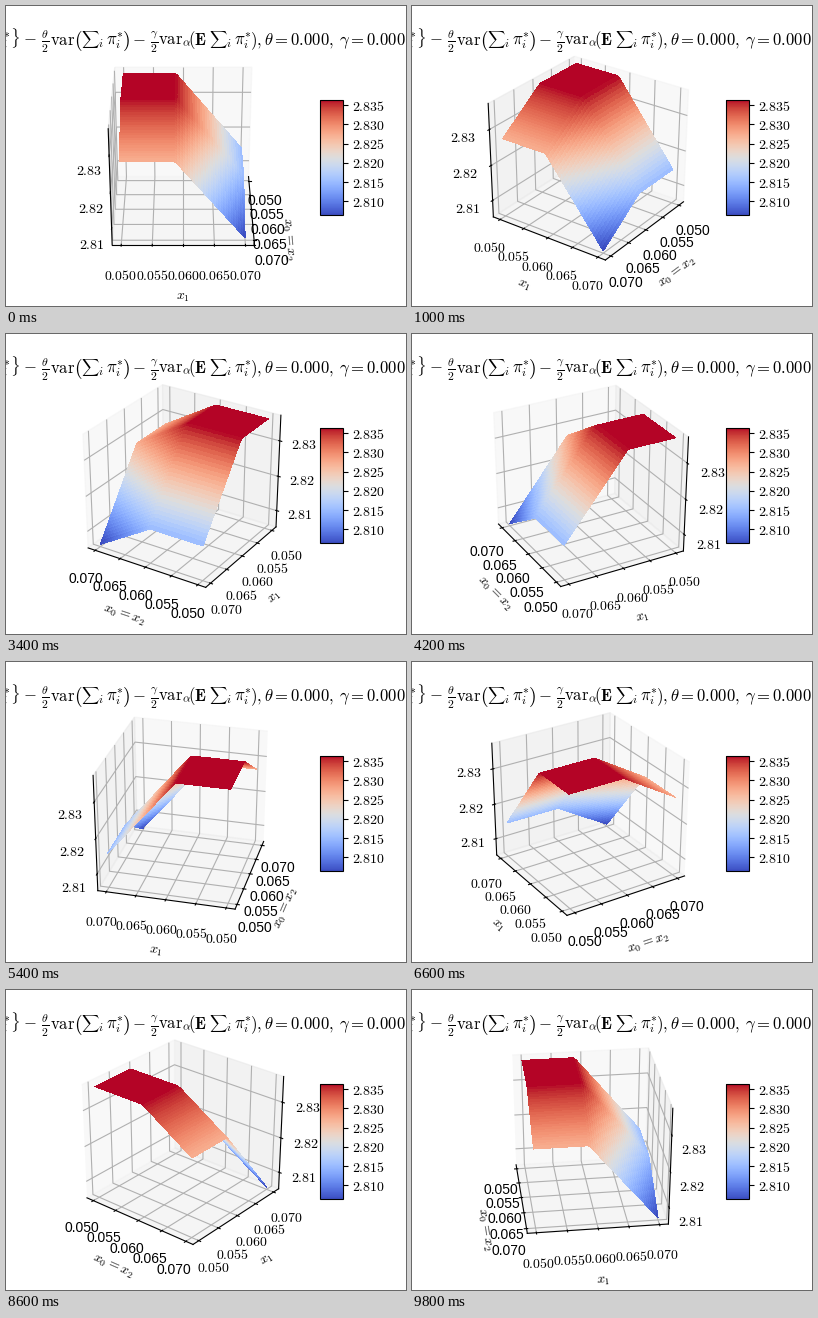
A matplotlib script that plays this animation: 400x300 px, repeating every 10000 ms.

```python
import numpy as np
import matplotlib.pyplot as plt
from matplotlib.animation import FuncAnimation

W, H = 400, 300
FRAMES, STEP_MS = 50, 200
LO, HI = 0.050, 0.070
KINK_X, KINK_Y = 0.060, 0.0587
Z_LO, Z_HI = 2.8058, 2.8364
BASELINE = 39

plt.rcParams.update({
    "font.family": "Liberation Sans",
    "mathtext.fontset": "cm",
    "font.size": 10,
})


def ramp(v, kink):
    return np.clip((v - kink) / (HI - kink), 0, None)


def padded(lo, hi, margin=0.0):
    """Limits widened by a data margin, then by the 3D pane margin."""
    pad = (hi - lo) * margin
    lo, hi = lo - pad, hi + pad
    edge = (hi - lo) / 48
    return lo - edge, hi + edge


def math_labels(ticks, digits):
    return [f"${t:.{digits}f}$" for t in ticks]


def box(x, y, w, h):
    return [x / W, y / H, w / W, h / H]


fig = plt.figure(figsize=(W / 100, H / 100), dpi=100, facecolor="white")
ax = fig.add_axes(box(50, 33, 248, 231), projection="3d")
# Fill the whole rectangle instead of shrinking to a square
ax.apply_aspect = lambda position=None: None
ax.set_box_aspect((1, 1, 1), zoom=np.sqrt(3) / 1.8294640721620434)

grid = np.linspace(LO, HI, 50)
X, Y = np.meshgrid(grid, grid)
Z = Z_HI - (Z_HI - Z_LO) * (0.3 * ramp(X, KINK_X) + 0.7 * ramp(Y, KINK_Y))
surf = ax.plot_surface(X, Y, Z, rstride=1, cstride=1, cmap="coolwarm",
                       linewidth=0, antialiased=False)

ax.set_xlim(*padded(LO, HI, 0.05))
ax.set_ylim(*padded(LO, HI, 0.05))
ax.set_zlim(*padded(Z_LO, Z_HI))

ticks = np.linspace(LO, HI, 5)
z_ticks = [2.81, 2.82, 2.83]
ax.set_xticks(ticks, labels=[f"{t:.3f}" for t in ticks])
ax.set_yticks(ticks, labels=math_labels(ticks, 3))
ax.set_zticks(z_ticks, labels=math_labels(z_ticks, 2))
ax.set_xlabel("$x_0=x_2$")
ax.set_ylabel("$x_1$")

cax = fig.add_axes(box(313.5, 90.75, 23.1, 115.5))
bar = fig.colorbar(surf, cax=cax)
bar_ticks = np.linspace(2.810, 2.835, 6)
bar.set_ticks(bar_ticks, labels=math_labels(bar_ticks, 3))


def put(x, tex, size=12, drop=0.0, ha="left"):
    fig.text(x / W, 1 - (BASELINE + drop) / H, f"${tex}$",
             size=size, ha=ha, va="baseline")


def put_sum(x):
    """Inline-size sum over i of pi, centred on the math axis."""
    put(x, r"\sum", size=8.7, drop=-1.5)
    put(x + 17.5, r"{}_i\,\pi_i^{*}")


# Title with inline spacing; it runs past the left edge
put(14, r"\pi_i^{*}\}", ha="right")
put(17, r"-\:\,\frac{\theta}{2}")
put(44.5, r"\mathrm{var}")
put(67.5, "(", size=14, drop=0.8)
put_sum(75)
put(115.8, ")", size=14, drop=0.8)
put(126.5, r"-\:\,\frac{\gamma}{2}")
put(152.3, r"\mathrm{var}_\alpha")
put(181.5, r"(\mathbf{E}")
put_sum(203)
put(244, "),")
put(258.5, r"\theta=0.000,")
put(333, r"\gamma=0.000")


def update(i):
    # The tiny offset settles which edges carry the axes at right angles
    ax.view_init(elev=30, azim=360 * i / FRAMES + 1e-5)
    return []


anim = FuncAnimation(fig, update, frames=FRAMES, interval=STEP_MS,
                     repeat=True, repeat_delay=0, blit=False)
plt.show()
```
